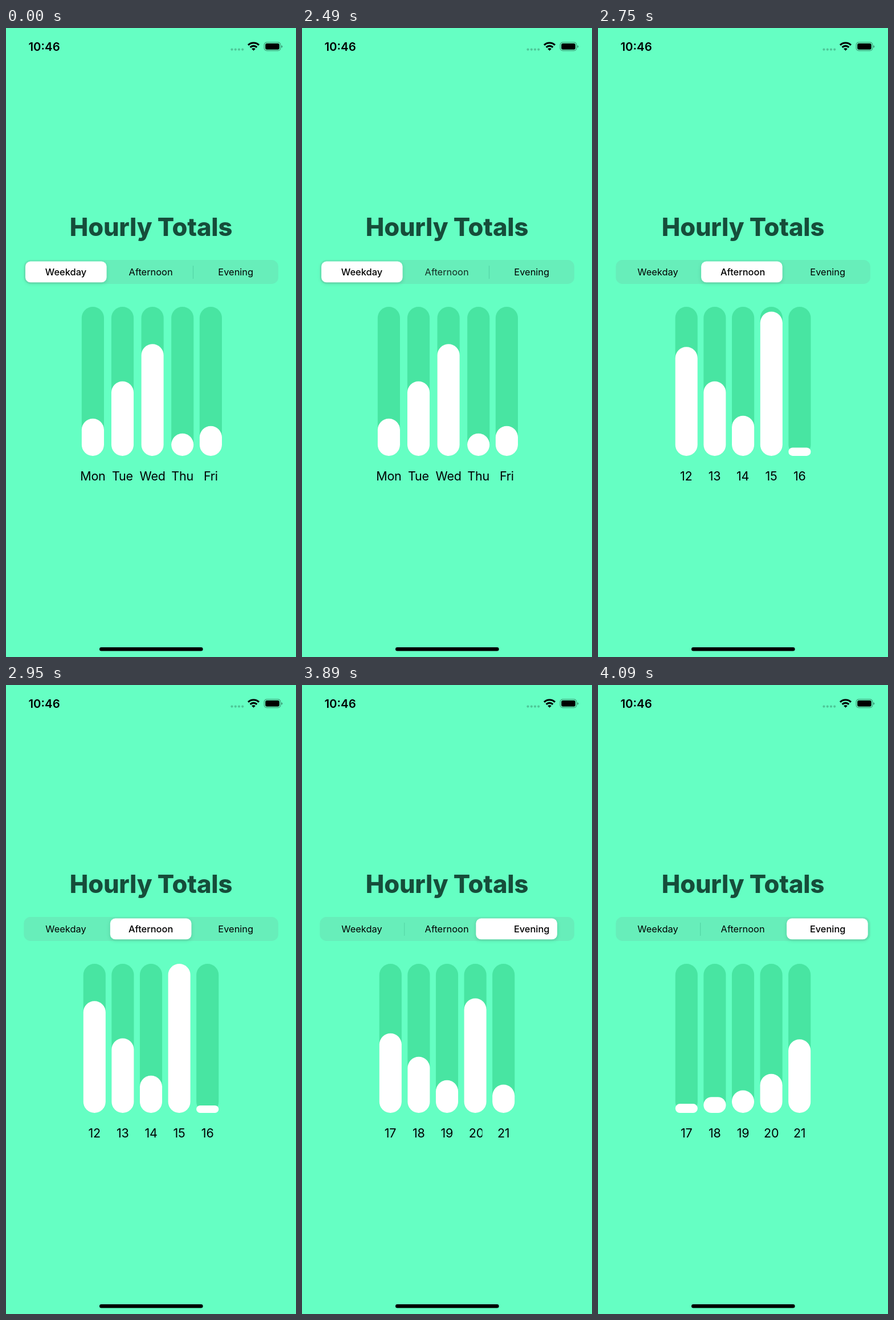
An HTML page for the animation above (4140 ms loop, 509 by 1101 pixels).

```html
<!DOCTYPE html>
<html lang="en">
<head>
<meta charset="utf-8">
<title>Hourly Totals</title>
<style>
  html, body { margin: 0; width: 100%; height: 100%; overflow: hidden; background: #65ffc3; }
  svg { display: block; width: 100%; height: 100%; font-family: Inter, Roboto, sans-serif; }
  .time { font-size: 20.4px; font-weight: 600; }
  .title { font-size: 43.5px; font-weight: 800; letter-spacing: -.2px; fill: #164d3a; text-anchor: middle; }
  .tab { font-size: 16.4px; font-weight: 400; text-anchor: middle; }
  .tab.on { font-weight: 500; }
  .label { font-size: 21.5px; letter-spacing: -.2px; }
  .knob { fill: #fff; filter: drop-shadow(0 2px 3px rgba(0, 0, 0, .14)); }
  .sep { fill: #55d5a6; }
  .track { fill: #48e5a2; }
  .fill { fill: #fff; }
</style>
</head>
<body>
<svg viewBox="0 0 509 1101">
  <text class="time" x="39.5" y="39.8">10:46</text>
  <g fill-opacity=".22">
    <circle cx="396.5" cy="37.6" r="2.1"/><circle cx="402.8" cy="37.6" r="2.1"/>
    <circle cx="409" cy="37.6" r="2.1"/><circle cx="415.2" cy="37.6" r="2.1"/>
  </g>
  <g transform="translate(0 -.6)">
    <g fill="none" stroke="#000" stroke-width="3.1">
      <path d="M425 30.5A13.4 13.4 0 0 1 444 30.5"/>
      <path d="M428.7 34.4A8.2 8.2 0 0 1 440.3 34.4"/>
    </g>
    <path d="M434.5 40.4L431.2 37.1A4.7 4.7 0 0 1 437.8 37.1Z"/>
  </g>
  <rect x="453.2" y="25.1" width="28.6" height="14.6" rx="4.4" fill="none" stroke="#000" stroke-opacity=".4" stroke-width="1.2"/>
  <rect x="455.2" y="27.1" width="24.6" height="10.6" rx="2.7"/>
  <path d="M483.4 30.2Q485.2 30.8 485.2 32.4T483.4 34.7Z" fill-opacity=".45"/>

  <text class="title" x="254.5" y="364.3">Hourly Totals</text>

  <rect x="31.3" y="406" width="446.6" height="42" rx="11.6" fill="#67eeba"/>
  <rect class="sep" x="179.1" y="416" width="1.2" height="23"/>
  <rect class="sep" x="327.9" y="416" width="1.2" height="23"/>
  <rect class="knob" y="408.5" width="142.6" height="36.8" rx="9"/>
  <text class="tab" x="105" y="433.2">Weekday</text>
  <text class="tab" x="254.1" y="433.2">Afternoon</text>
  <text class="tab" x="403.2" y="433.2">Evening</text>

  <g id="chart"></g>
  <rect x="164" y="1084" width="181.6" height="6.5" rx="3.25"/>
</svg>
<script>
const LOOP = 4140, UNIT = 1.305, BAR = 30 * UNIT, FLOOR = 749;
const even = [155.3, 204.9, 254.5, 304.1, 353.7];
const states = [
  { names: ['Mon', 'Tue', 'Wed', 'Thu', 'Fri'], values: [50, 100, 150, 30, 40],
    centers: [152.4, 204.5, 257.1, 309.7, 359.4], knob: 34 },
  { names: ['12', '13', '14', '15', '16'], values: [150, 100, 50, 200, 10], centers: even, knob: 182.9 },
  { names: ['17', '18', '19', '20', '21'], values: [10, 20, 30, 50, 100], centers: even, knob: 331.9 }
];
const moves = [
  { bars: 2478, span: 316, knob: 2450 },
  { bars: 3743, span: 381, knob: 3743 }
];

const all = q => [...document.querySelectorAll(q)];
const chart = document.getElementById('chart');
const knob = document.querySelector('.knob');
const tabs = all('.tab'), seps = all('.sep');
const lerp = (a, b, p) => a + (b - a) * p;

function add(parent, tag, attrs) {
  const el = document.createElementNS('http://www.w3.org/2000/svg', tag);
  set(el, attrs);
  return parent.appendChild(el);
}
function set(el, attrs) {
  for (const key in attrs) el.setAttribute(key, attrs[key]);
}

const columns = even.map((_, i) => {
  const track = add(chart, 'rect', { class: 'track', y: FLOOR - 200 * UNIT, width: BAR, height: 200 * UNIT, rx: BAR / 2 });
  const fill = add(chart, 'rect', { class: 'fill', width: BAR });
  const clip = add(add(chart, 'clipPath', { id: 'clip' + i }), 'rect', { y: 765, height: 40 });
  const group = add(chart, 'g', { 'clip-path': `url(#clip${i})` });
  const label = add(group, 'text', { class: 'label', y: 791.6 });
  const widths = states.map(s => {
    label.textContent = s.names[i];
    return label.getComputedTextLength();
  });
  return { track, fill, clip, label, widths };
});

// cubic-bezier(.42, 0, .58, 1)
function easeInOut(x) {
  if (x <= 0) return 0;
  if (x >= 1) return 1;
  let lo = 0, hi = 1, u;
  for (let n = 0; n < 24; n++) {
    u = (lo + hi) / 2;
    const at = 1.26 * u * (1 - u) ** 2 + 1.74 * u * u * (1 - u) + u ** 3;
    if (at < x) lo = u; else hi = u;
  }
  return u * u * (3 - 2 * u);
}

// critically damped spring
function spring(ms) {
  const u = Math.max(0, ms) * .0214;
  return 1 - (1 + u) * Math.exp(-u);
}

// the picture advances in 50 ms ticks
const tick = t => t < 3740 ? Math.floor(t / 50) * 50 : Math.floor((t - 40) / 50) * 50 + 40;

function drawTabs(t) {
  const [p, q] = moves.map(m => spring(t - m.knob));
  const x = lerp(lerp(states[0].knob, states[1].knob, p), states[2].knob, q);
  knob.setAttribute('x', x);
  seps[0].setAttribute('opacity', q);
  seps[1].setAttribute('opacity', 1 - p);
  const on = q > 0 ? 2 : p > 0 ? 1 : 0;
  tabs.forEach((tab, i) => {
    const since = i ? t - moves[i - 1].knob : -99;
    tab.classList.toggle('on', i === on);
    tab.setAttribute('opacity', since >= -10 && since < 90 ? .82 : 1);
  });
}

function drawChart(t) {
  const move = t < 3000 ? 0 : 1;
  const { bars, span } = moves[move];
  const p = easeInOut((t - bars) / span);
  const from = states[move], to = states[move + 1];
  columns.forEach((c, i) => {
    const x = lerp(from.centers[i], to.centers[i], p) - BAR / 2;
    const height = lerp(from.values[i], to.values[i], p) * UNIT;
    const left = lerp(from.centers[i] - c.widths[move] / 2, to.centers[i] - c.widths[move + 1] / 2, p);
    c.track.setAttribute('x', x);
    set(c.fill, { x, y: FLOOR - height, height, rx: Math.min(BAR, height) / 2 });
    c.label.setAttribute('x', left);
    c.label.textContent = (p > 0 ? to : from).names[i];
    set(c.clip, { x: left - 4, width: lerp(c.widths[move], c.widths[move + 1], p) + 5 });
  });
}

const start = performance.now();
function frame() {
  const t = tick((performance.now() - start) % LOOP);
  drawTabs(t);
  drawChart(t);
  requestAnimationFrame(frame);
}
frame();
</script>
</body>
</html>
```
